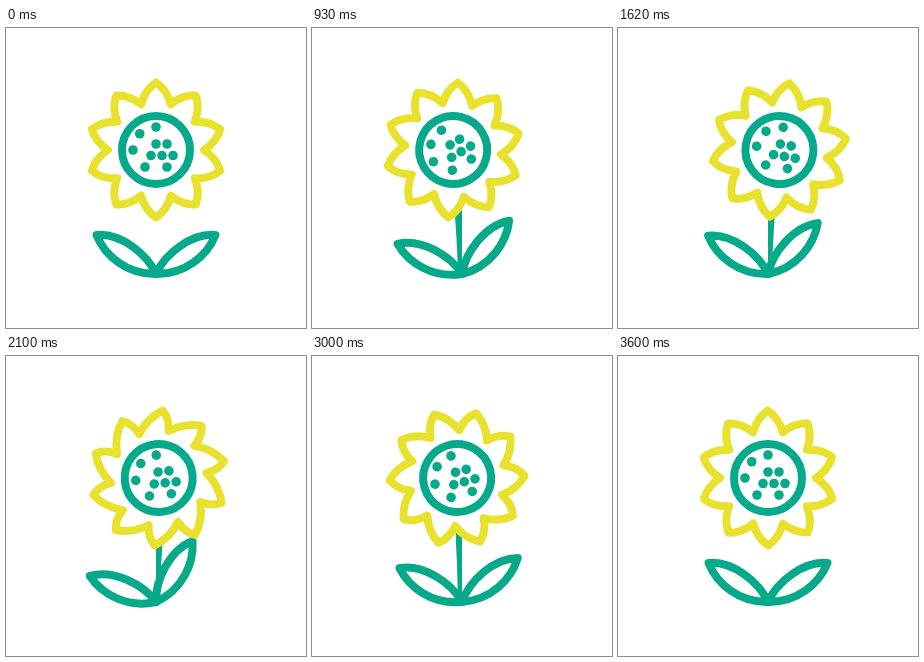
An HTML page with a canvas for the animation above (3640 ms loop, 300x300 px).

```html
<!DOCTYPE html>
<html lang="en">
<head>
<meta charset="utf-8">
<title>Swaying flower</title>
<style>
  html, body { margin: 0; width: 100%; height: 100%; overflow: hidden; background: #fff; }
  canvas { display: block; width: 100vw; height: 100vh; }
</style>
</head>
<body>
<canvas id="stage" width="300" height="300"></canvas>
<script>
const ctx = document.getElementById('stage').getContext('2d');
const GREEN = '#06a98a', YELLOW = '#e8e22e';
const LOOP = 3640, STEP = 30, LAG = 100;
const BASE = { x: 150, y: 246 }, HEAD_Y = 122;
const PETALS = 10, PETAL_ANGLE = 360 / PETALS;

// Sine easing between [time, value] turning points, starting and ending at rest.
function swing(...turns) {
  const keys = [[0, 0], ...turns, [LOOP, 0]];
  return time => {
    const t = (time + LOOP) % LOOP;
    const next = keys.findIndex(([end]) => t < end);
    const [t0, v0] = keys[next - 1], [t1, v1] = keys[next];
    const eased = (1 - Math.cos(Math.PI * (t - t0) / (t1 - t0))) / 2;
    return v0 + (v1 - v0) * eased;
  };
}

const sway = swing([570, -11], [720, -11], [1800, 13], [2450, -10.5], [3500, 0]);
const spin = swing([840, -32], [1600, 9.5], [1850, 9.5], [2440, -31], [3560, 0]);
const rightLeaf = swing([850, -17], [1200, -3], [2150, -26], [3350, 0]);
const leftLeaf = swing([850, -8.5], [1500, 0], [2460, -17], [3300, 0]);

const rad = deg => deg * Math.PI / 180;
const polar = (r, deg) => [r * Math.sin(rad(deg)), -r * Math.cos(rad(deg))];

// Three seeds on an arc, the rest on a staggered grid.
const arcSeeds = [0, -45, -90].map(deg => polar(23, deg));
const gridSeeds = [[0, 1], [0, 1, 2], [-1, 1]].flatMap((row, r) =>
  row.map(col => [11 * col - 5 * (r % 2), 11.5 * r - 6]));
const SEEDS = [...arcSeeds, ...gridSeeds];

function drawLeaf(side, angle) {
  ctx.save();
  ctx.translate(BASE.x, BASE.y);
  ctx.rotate(rad(angle));
  ctx.scale(side, 1);
  ctx.beginPath();
  ctx.moveTo(0, 0);
  ctx.bezierCurveTo(9, -20, 35, -41, 59.5, -39);
  ctx.bezierCurveTo(51, -18, 29, 0.5, 0, 0);
  ctx.closePath();
  ctx.stroke();
  ctx.restore();
}

// The stem shows only between its own two ends, so it vanishes when upright.
function drawStem(dx) {
  ctx.save();
  ctx.beginPath();
  ctx.rect(BASE.x, 0, dx, 300);
  ctx.clip();
  ctx.beginPath();
  ctx.moveTo(BASE.x, BASE.y);
  ctx.quadraticCurveTo(BASE.x + dx * 0.15, 184, BASE.x + dx, HEAD_Y);
  ctx.stroke();
  ctx.restore();
}

function drawPetals(lean) {
  const half = PETAL_ANGLE / 2, bulge = 10.5, bend = lean * 0.6;
  ctx.beginPath();
  ctx.moveTo(...polar(48, -half));
  for (let i = 0; i < PETALS; i++) {
    const a = i * PETAL_ANGLE;
    ctx.quadraticCurveTo(...polar(61, a - bulge + bend), ...polar(67.5, a + lean));
    ctx.quadraticCurveTo(...polar(61, a + bulge + bend), ...polar(48, a + half));
  }
  ctx.closePath();
  ctx.fillStyle = '#fff';
  ctx.fill();
  ctx.strokeStyle = YELLOW;
  ctx.stroke();
}

function drawHead(dx, angle, lean) {
  ctx.save();
  ctx.translate(BASE.x + dx, HEAD_Y);
  ctx.rotate(rad(angle));
  drawPetals(lean);

  ctx.beginPath();
  ctx.arc(0, 0, 34, 0, 2 * Math.PI);
  ctx.strokeStyle = GREEN;
  ctx.stroke();

  ctx.fillStyle = GREEN;
  for (const [x, y] of SEEDS) {
    ctx.beginPath();
    ctx.arc(x, y, 4.8, 0, 2 * Math.PI);
    ctx.fill();
  }
  ctx.restore();
}

function draw(t) {
  ctx.fillStyle = '#fff';
  ctx.fillRect(0, 0, 300, 300);
  ctx.lineWidth = 8;
  ctx.lineCap = ctx.lineJoin = 'round';
  ctx.strokeStyle = GREEN;
  // Stem and petal tips trail behind the head.
  drawStem(sway(t - LAG));
  drawLeaf(1, rightLeaf(t));
  drawLeaf(-1, leftLeaf(t));
  drawHead(sway(t), spin(t), spin(t - LAG) - spin(t));
}

const start = performance.now();
function tick() {
  const t = (performance.now() - start) % LOOP;
  draw(Math.min(Math.floor(t / STEP) * STEP, LOOP - 40));
  requestAnimationFrame(tick);
}
tick();
</script>
</body>
</html>
```
